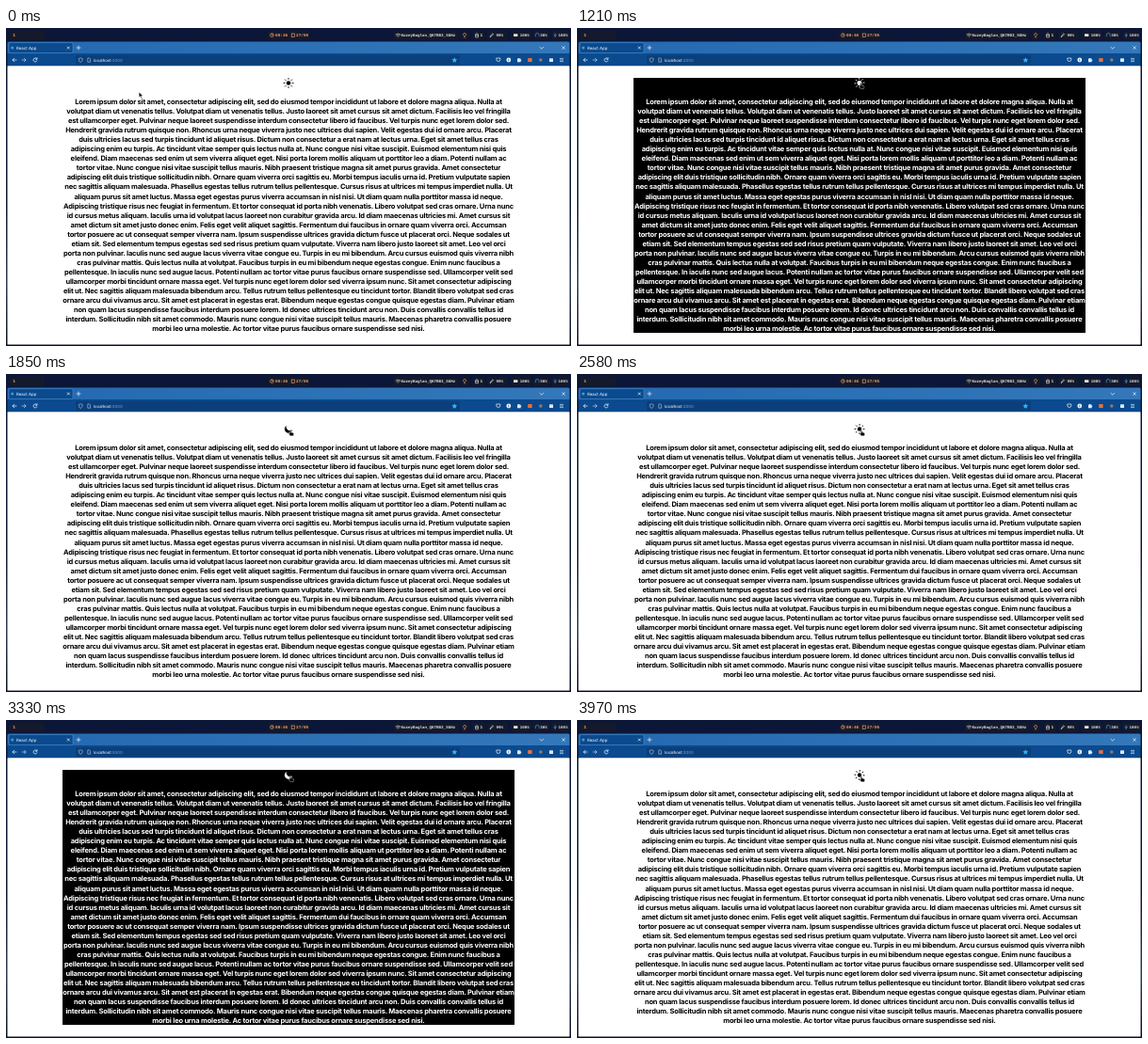
These frames come from a looping animation (600x338 px, 4000 ms). An HTML page:

```html
<!DOCTYPE html>
<html lang="en">
<head>
<meta charset="utf-8">
<title>Theme toggle</title>
<style>
html, body { margin: 0; width: 100%; height: 100%; overflow: hidden; background: #0b1638; }
svg { display: block; width: 100vw; height: 100vh; }
text { text-rendering: geometricPrecision; white-space: pre; }
.ui { font-family: Inter, "Noto Sans", sans-serif; }
.mono { font-family: "Liberation Mono", monospace; font-weight: bold; }
#copy { font-family: Inter, sans-serif; font-weight: 700; letter-spacing: -.025em; text-anchor: middle; }
</style>
</head>
<body>
<svg viewBox="0 0 600 338" preserveAspectRatio="none">
  <defs>
    <linearGradient id="wall" x2="0" y2="1">
      <stop offset="0" stop-color="#0b1638"/>
      <stop offset=".55" stop-color="#0a1632"/>
      <stop offset=".8" stop-color="#2b3a55"/>
      <stop offset="1" stop-color="#0a1020"/>
    </linearGradient>
    <linearGradient id="strip">
      <stop offset="0" stop-color="#2468b0"/>
      <stop offset="1" stop-color="#3478ba"/>
    </linearGradient>
    <mask id="bite" maskUnits="userSpaceOnUse" x="-12" y="-12" width="48" height="48">
      <rect x="-12" y="-12" width="48" height="48" fill="#fff"/>
      <circle id="hole" r="9" fill="#000"/>
    </mask>
  </defs>
  <rect width="600" height="338" fill="url(#wall)"/>
  <g id="bar"></g>
  <g id="browser">
    <rect x="1.5" y="14.5" width="597" height="14" rx="1.5" fill="url(#strip)"/>
    <rect x="1.5" y="27" width="597" height="13.5" fill="#0b4a8e"/>
    <rect x="3" y="15.6" width="68" height="11" rx="1.5" fill="#0b4a8e" stroke="#5a9ad6" stroke-width=".5"/>
    <circle cx="6.7" cy="21" r="1.5" fill="#4b9cc4"/>
    <g fill="none" stroke="#f3f8fd" stroke-width=".7" stroke-linecap="round" stroke-linejoin="round">
      <path d="M65.2 19.9l2.2 2.2m0-2.2l-2.2 2.2M75 21h4m-2-2v4M567 20.4l1.8 1.7 1.8-1.7M590.8 19.7l2.6 2.6m0-2.6l-2.6 2.6"/>
      <path d="M11 34H7m1.7-1.8L7 34l1.7 1.8"/>
      <path d="M17 34h4m-1.7-1.8L21 34l-1.7 1.8" opacity=".75"/>
      <path d="M32.8 33a2 2 0 1 0 .1 1.8M33 31.7v1.5h-1.5"/>
    </g>
    <rect x="74" y="28.8" width="408" height="10.2" rx="1.5" fill="#0b3f7a"/>
    <g fill="none" stroke="#c5d9ee" stroke-width=".55">
      <path d="M79.2 31.8l2 .7c0 2-.5 3.2-2 4-1.5-.8-2-2-2-4z"/>
      <path d="M86.8 31.9h1.8l1 1v3.3h-2.8z"/>
    </g>
    <path d="M476.3 31.2l.9 1.8 2 .3-1.5 1.4.4 2-1.8-1-1.8 1 .4-2-1.5-1.4 2-.3z" fill="#25b5ff"/>
    <path d="M520.8 32h4v1.5a2 2 0 0 1-4 0z" fill="none" stroke="#f3f8fd" stroke-width=".7"/>
    <circle cx="533.8" cy="34" r="2.4" fill="#f3f8fd"/>
    <path d="M533.8 32.6v2.8" stroke="#0b4a8e" stroke-width=".7"/>
    <path d="M543 32.5h1v-.6h1.2v.6h1.4v1.3h.6v1.2h-.6v1.3H543z" fill="#dbe9f7"/>
    <rect x="554.2" y="32" width="4.4" height="4" rx=".6" fill="#ea6f3c"/>
    <circle cx="567.8" cy="34" r="1.8" fill="#8f7a70"/>
    <rect x="577" y="32.2" width="4" height="3.8" rx=".6" fill="#dbe9f7"/>
    <path d="M588 32.4h4m-4 1.6h4m-4 1.6h4" stroke="#f3f8fd" stroke-width=".6"/>
  </g>
  <rect x="1.5" y="40.3" width="597" height="296.2" rx=".6" fill="#fff"/>
  <rect id="panel" x="60" y="53" width="480" height="271"/>
  <g id="icon">
    <circle id="disc" cx="12" cy="12" mask="url(#bite)"/>
    <g id="rays" stroke-width="2" stroke-linecap="round"></g>
  </g>
  <g id="copy"></g>
  <g fill="#000" stroke="#fff" stroke-width=".35" stroke-linejoin="round">
    <path id="arrow" d="M0 0v5.2l1.3-1.1.9 1.9.9-.4-.9-1.9h1.7z"/>
    <path id="hand" d="M-.6.4a.6.6 0 0 1 1.2 0v2.1l2.3.5q.9.2.8 1.1l-.4 2.2h-3.3l-1.7-2.1q-.3-.8.5-.7l.6.5z"/>
  </g>
</svg>
<script>
const LOOP = 4000;
const CLICKS = [1150, 1850, 2610, 3360];
const LINES = `Lorem ipsum dolor sit amet, consectetur adipiscing elit, sed do eiusmod tempor incididunt ut labore et dolore magna aliqua. Nulla at
volutpat diam ut venenatis tellus. Volutpat diam ut venenatis tellus. Justo laoreet sit amet cursus sit amet dictum. Facilisis leo vel fringilla
est ullamcorper eget. Pulvinar neque laoreet suspendisse interdum consectetur libero id faucibus. Vel turpis nunc eget lorem dolor sed.
Hendrerit gravida rutrum quisque non. Rhoncus urna neque viverra justo nec ultrices dui sapien. Velit egestas dui id ornare arcu. Placerat
duis ultricies lacus sed turpis tincidunt id aliquet risus. Dictum non consectetur a erat nam at lectus urna. Eget sit amet tellus cras
adipiscing enim eu turpis. Ac tincidunt vitae semper quis lectus nulla at. Nunc congue nisi vitae suscipit. Euismod elementum nisi quis
eleifend. Diam maecenas sed enim ut sem viverra aliquet eget. Nisi porta lorem mollis aliquam ut porttitor leo a diam. Potenti nullam ac
tortor vitae. Nunc congue nisi vitae suscipit tellus mauris. Nibh praesent tristique magna sit amet purus gravida. Amet consectetur
adipiscing elit duis tristique sollicitudin nibh. Ornare quam viverra orci sagittis eu. Morbi tempus iaculis urna id. Pretium vulputate sapien
nec sagittis aliquam malesuada. Phasellus egestas tellus rutrum tellus pellentesque. Cursus risus at ultrices mi tempus imperdiet nulla. Ut
aliquam purus sit amet luctus. Massa eget egestas purus viverra accumsan in nisl nisi. Ut diam quam nulla porttitor massa id neque.
Adipiscing tristique risus nec feugiat in fermentum. Et tortor consequat id porta nibh venenatis. Libero volutpat sed cras ornare. Urna nunc
id cursus metus aliquam. Iaculis urna id volutpat lacus laoreet non curabitur gravida arcu. Id diam maecenas ultricies mi. Amet cursus sit
amet dictum sit amet justo donec enim. Felis eget velit aliquet sagittis. Fermentum dui faucibus in ornare quam viverra orci. Accumsan
tortor posuere ac ut consequat semper viverra nam. Ipsum suspendisse ultrices gravida dictum fusce ut placerat orci. Neque sodales ut
etiam sit. Sed elementum tempus egestas sed sed risus pretium quam vulputate. Viverra nam libero justo laoreet sit amet. Leo vel orci
porta non pulvinar. Iaculis nunc sed augue lacus viverra vitae congue eu. Turpis in eu mi bibendum. Arcu cursus euismod quis viverra nibh
cras pulvinar mattis. Quis lectus nulla at volutpat. Faucibus turpis in eu mi bibendum neque egestas congue. Enim nunc faucibus a
pellentesque. In iaculis nunc sed augue lacus. Potenti nullam ac tortor vitae purus faucibus ornare suspendisse sed. Ullamcorper velit sed
ullamcorper morbi tincidunt ornare massa eget. Vel turpis nunc eget lorem dolor sed viverra ipsum nunc. Sit amet consectetur adipiscing
elit ut. Nec sagittis aliquam malesuada bibendum arcu. Tellus rutrum tellus pellentesque eu tincidunt tortor. Blandit libero volutpat sed cras
ornare arcu dui vivamus arcu. Sit amet est placerat in egestas erat. Bibendum neque egestas congue quisque egestas diam. Pulvinar etiam
non quam lacus suspendisse faucibus interdum posuere lorem. Id donec ultrices tincidunt arcu non. Duis convallis convallis tellus id
interdum. Sollicitudin nibh sit amet commodo. Mauris nunc congue nisi vitae suscipit tellus mauris. Maecenas pharetra convallis posuere
morbi leo urna molestie. Ac tortor vitae purus faucibus ornare suspendisse sed nisi.`.split("\n");

const $ = id => document.getElementById(id);

function add(parent, tag, attrs, text) {
  const el = document.createElementNS("http://www.w3.org/2000/svg", tag);
  set(el, attrs);
  if (text) el.textContent = text;
  return parent.appendChild(el);
}

function set(el, attrs) {
  for (const key in attrs) el.setAttribute(key, attrs[key]);
}

function label(parent, x, y, size, text, fill = "#e9e4e1", cls = "mono") {
  return add(parent, "text", { x, y, "font-size": size, fill, class: cls }, text);
}

function buildBar() {
  const bar = $("bar");
  const pill = (x, w) => add(bar, "rect", { x, y: 2.6, width: w, height: 9.6, rx: 1.6, fill: "#141a2c" });
  const stroke = (d, color) => add(bar, "path", { d, fill: "none", stroke: color, "stroke-width": .65, "stroke-linecap": "round" });
  const orange = "#f0a070", pale = "#e9e4e1", blue = "#58a6ef";
  [[3, 38], [278, 44.5], [412, 68.5], [482.5, 9], [495.5, 13], [511, 21.5], [536.5, 21], [560, 17], [579.5, 18.5]]
    .forEach(([x, w]) => pill(x, w));

  label(bar, 7.2, 9.2, 4.6, "1", orange);
  add(bar, "circle", { cx: 282.4, cy: 7.6, r: 1.9, fill: "none", stroke: orange, "stroke-width": .65 });
  stroke("M282.4 6.5v1.2h.9", orange);
  label(bar, 286, 9.2, 4.4, "00:46", orange);
  add(bar, "rect", { x: 303.2, y: 6, width: 3.4, height: 3.4, fill: "none", stroke: orange, "stroke-width": .65 });
  label(bar, 308, 9.2, 4.4, "27/05", orange);
  stroke("M414 6.8q2.3-1.8 4.6 0M414.9 8q1.4-1 2.8 0M416.3 9.1v.1", pale);
  label(bar, 419.4, 9.2, 4.2, "KuzeyBaglan_QK7RB3_5GHz");
  stroke("M486.4 8.4a1.5 1.5 0 1 1 1.4 0zM486.5 9.8h1.2", orange);
  stroke("M498.6 9.4V6.6q1.4-2 2.8 0v2.8zM498.6 7.6h2.8", pale);
  label(bar, 503.6, 9.2, 4.4, "1");
  stroke("M514.2 9.4l1-2 1.6-1.6.8.8-1.6 1.6z", pale);
  label(bar, 520.5, 9.2, 4.2, "99%");
  add(bar, "rect", { x: 539, y: 6.2, width: 4.4, height: 2.8, rx: .4, fill: pale });
  label(bar, 545.8, 9.2, 4.2, "100%");
  stroke("M562.3 8.8V7.4a1.9 1.9 0 0 1 3.8 0v1.4", blue);
  label(bar, 567.3, 9.2, 4.2, "30%");
  stroke("M583.2 5.8v2M581.8 7.6q1.4 2 2.8 0M583.2 8.6v1", blue);
  label(bar, 586.6, 9.2, 4.2, "100%");
}

function buildPage() {
  const ui = $("browser");
  label(ui, 11, 22.6, 4.4, "React App", "#fff", "ui");
  const url = label(ui, 93, 35.6, 4.35, "localhost", "#fff", "ui");
  add(url, "tspan", { fill: "#7fa3ca" }, ":3000");

  for (let i = 0; i < 8; i++) {
    add($("rays"), "line", { x1: 12, x2: 12, y1: 1, y2: 3, transform: `rotate(${i * 45} 12 12)` });
  }
  const copy = $("copy");
  set(copy, { "font-size": 7.5 });
  LINES.forEach((line, i) => add(copy, "text", { x: 300, y: 81.35 + i * 10.015 }, line));
  // One type size for the whole paragraph, taken from its opening line.
  set(copy, { "font-size": 7.5 * 454 / copy.firstChild.getComputedTextLength() });
}

const clamp = v => Math.max(0, Math.min(1, v));
const mix = (a, b, k) => a + (b - a) * k;
const ease = (t, from, to) => {
  const k = clamp((t - from) / (to - from));
  return k * k * (3 - 2 * k);
};

// Step response of a damped spring: mass 4, tension 250, friction 35.
function spring(ms) {
  if (ms <= 0) return 0;
  const s = ms / 1000, decay = 35 / 8, freq = Math.sqrt(250 / 4 - decay * decay);
  return 1 - Math.exp(-decay * s) * (Math.cos(freq * s) + decay / freq * Math.sin(freq * s));
}

function draw(t) {
  const dark = CLICKS.filter(c => t >= c).length % 2 === 1;
  const moon = CLICKS.reduce((sum, c, i) => sum + (i % 2 ? -1 : 1) * spring(t - c), 0);
  const ink = dark ? "#fff" : "#000";

  set($("panel"), { fill: dark ? "#000" : "#fff" });
  set($("copy"), { fill: ink });
  set($("icon"), {
    fill: ink, stroke: "none",
    transform: `translate(300 58.5) rotate(${mix(90, 40, moon)}) scale(.46) translate(-12 -12)`
  });
  set($("disc"), { r: Math.max(0, mix(5, 9, moon)) });
  set($("hole"), { cx: mix(24, 12, moon), cy: mix(0, 5.52, moon) });
  set($("rays"), { stroke: ink, opacity: clamp(1 - moon) });

  const first = ease(t, 0, 390), second = ease(t, 520, 940), drift = ease(t, 1120, 1400);
  const x = 141.3 + 88.7 * first + 71 * second + .9 * drift;
  const y = 68.3 + 4.7 * first - 15 * second + 1.4 * drift;
  const over = x > 294.5;
  const at = `translate(${x} ${y})`;
  set($("arrow"), { transform: at, visibility: over ? "hidden" : "visible" });
  set($("hand"), { transform: at, visibility: over ? "visible" : "hidden" });
}

function tick() {
  draw(performance.now() % LOOP);
  requestAnimationFrame(tick);
}

buildBar();
buildPage();
tick();
</script>
</body>
</html>
```
